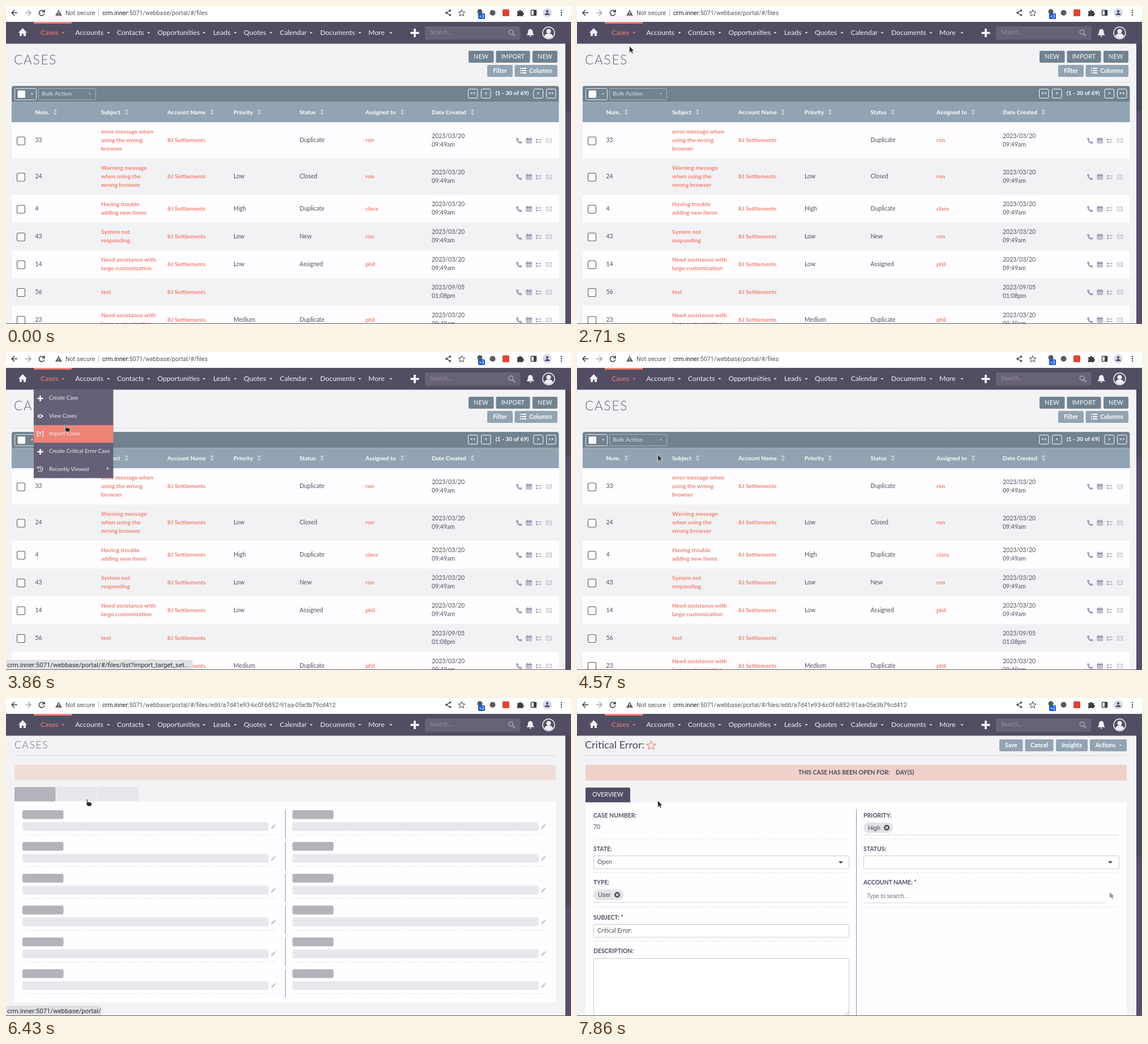
An HTML page for the animation above (8000 ms loop, 998 by 561 pixels).

```html
<!DOCTYPE html>
<html lang="en">
<head>
<meta charset="utf-8">
<title>Case list</title>
<style>
  html, body { margin: 0; width: 100%; height: 100%; overflow: hidden; background: #f3f2f4; }
  svg { display: block; width: 100vw; height: 100vh; font-family: Lato, sans-serif; }
  .ui { font-family: Roboto, sans-serif; }
  .arial { font-family: "Liberation Sans", Arial, sans-serif; }
</style>
</head>
<body>
<svg id="stage" viewBox="0 0 998 561"></svg>
<script>
const INK = '#534d64', SALMON = '#f08377', SLATE = '#718290', STEEL = '#92a4b3', PANEL = '#fffdff', ICON = '#9c99b7';
const HOST = 'crm.inner', PATH = ':5071/webbase/portal/';
const LIST_URL = PATH + '#/files';
const EDIT_URL = LIST_URL + '/edit/a7d41e93-6c0f-b852-91aa-05e3b79cd412';
const IMPORT_URL = HOST + LIST_URL + '/list?import_target_set...';

// Drawing helpers; text is placed by its vertical centre.
const rect = (x, y, w, h, fill, r = 0, more = '') =>
  `<rect x="${x}" y="${y}" width="${w}" height="${h}" fill="${fill}" rx="${r}" ${more}/>`;
const box = (x, y, w, h, stroke, r = 2, fill = 'none', sw = 1) =>
  rect(x + .5, y + .5, w - 1, h - 1, fill, r, `stroke="${stroke}" stroke-width="${sw}"`);
const text = (x, y, str, fill = INK, size = 10.5, more = '') =>
  `<text x="${x}" y="${y + size * .35}" fill="${fill}" font-size="${size}" ${more}>${str}</text>`;
const bold = (x, y, str, fill = INK, size = 10.3, more = '') =>
  text(x, y, str, fill, size, 'font-weight="700" ' + more);
const MID = 'text-anchor="middle"';
const path = (d, fill, more = '') => `<path d="${d}" fill="${fill}" ${more}/>`;
const line = (d, stroke, w = 1, more = '') => path(d, 'none', `stroke="${stroke}" stroke-width="${w}" ${more}`);
const circle = (x, y, r, fill, more = '') => `<circle cx="${x}" cy="${y}" r="${r}" fill="${fill}" ${more}/>`;
const at = (x, y, body) => `<g transform="translate(${x} ${y})">${body}</g>`;
const layer = (id, body) => `<g id="${id}">${body}</g>`;
const caret = (x, y, fill, r = 3) => path(`M${x - r} ${y - r / 2}h${2 * r}l${-r} ${r}z`, fill);
const plus = (x, y, r, w) => line(`M${x - r} ${y}h${2 * r}M${x} ${y - r}v${2 * r}`, '#fff', w);
const dots = (x1, x2, y, gap = 4) => line(`M${x1} ${y}H${x2}`, '#c3c2cb', 1, `stroke-dasharray="1.5 ${gap}"`);
const button = (x, y, w, label, fill, tx = x + w / 2) =>
  rect(x, y, w, 21, fill, 2) + bold(tx, y + 10, label, '#fff', 10.5, MID);

function browserBar() {
  const dark = '#3c4043';
  return rect(0, 0, 998, 28, '#fff') +
    line('M20 12H10.500M15 7l-5 5l5 5', dark, 1.5) +
    line('M34 12h9.500M39 7l5 5l-5 5', '#a5a7aa', 1.5) +
    line('M67 9.500a4.700 4.700 0 1 0 .8 3.500M68 6.500v4h-4', dark, 1.5) +
    path('M93 6.500l6 10.500h-12z', '#5f6368') + line('M93 10v3.500M93 14.500v1.300', '#fff', 1.2) +
    text(105, 12, 'Not secure', '#55585c', 10.8, 'class="ui"') +
    rect(163, 6, 1, 12, '#b9bbbe') +
    `<text class="ui" x="170" y="15.700" font-size="10.700" fill="#202124">${HOST}<tspan id="url" fill="#55585c"></tspan></text>` +
    line('M784 8l-6 4l6 4', dark, 1.2) + circle(784.5, 8, 1.8, dark) + circle(778, 12, 1.8, dark) + circle(784.5, 16, 1.8, dark) +
    path('M805 6.500l1.600 3.900l4.200.3l-3.200 2.700l1 4.100l-3.600-2.200l-3.600 2.200l1-4.100l-3.200-2.700l4.200-.3z', 'none', `stroke="${dark}"`) +
    circle(837, 10, 4.5, '#55585c') + rect(834, 13, 12, 10, '#1757d6', 2) + bold(840, 18, '+3', '#fff', 7.5, MID) +
    circle(859.5, 12, 5, '#5b5b5b') + rect(877, 6, 12, 12, '#de4335', 1.5) +
    path('M903 9h3a2 2 0 0 1 4 0h3v3a2 2 0 0 1 0 4v2h-4a2 2 0 0 0-3 0h-3v-4a2 2 0 0 0 0-3z', dark) +
    box(927, 7, 10, 10, dark, 1, '#fff', 1.5) + rect(932, 7, 5, 10, dark) +
    circle(956, 12, 8, '#d5dbea') + circle(956, 9.5, 2.2, INK) + path('M951.500 16q0-3.500 4.500-3.500t4.500 3.500z', INK) +
    [8, 12, 16].map(y => circle(981, y, 1.2, dark)).join('');
}

function navBar() {
  const items = [['Cases', 61, 101], ['Accounts', 122.5, 181], ['Contacts', 196, 252], ['Opportunities', 267.5, 350],
    ['Leads', 366, 405], ['Quotes', 420, 468], ['Calendar', 483.5, 539], ['Documents', 555, 625], ['More', 640, 680]];
  return rect(0, 28, 998, 38.500, INK) + rect(49, 28, 67, 3, SALMON) +
    path('M22 47l7.500-8l7.500 8h-2v6h-4v-4h-3v4h-4v-6z', '#f1eff4') +
    items.map(([label, x, cx], i) => {
      const fill = i ? '#f4f2f7' : SALMON;
      return text(x, 46.5, label, fill, 12.2) + caret(cx, 47.5, fill, 2.7);
    }).join('') +
    plus(722, 47.5, 7.5, 3.6) +
    rect(740, 36, 168.500, 23.500, '#686279', 3) + text(749, 46.500, 'Search...', '#958fa2', 10.6) +
    circle(892, 46, 3.8, 'none', 'stroke="#aaa5b5" stroke-width="1.500"') + line('M895 49l4 4', '#aaa5b5', 1.8) +
    path('M919.500 51.500q2.500-2 2.500-6q0-4.500 4.200-5q4.200.5 4.200 5q0 4 2.500 6zM924.300 52.500h3.800q-1.900 4-3.800 0', '#f1eff4') +
    circle(958.5, 47.5, 10.5, 'none', 'stroke="#f1eff4" stroke-width="1.500"') + circle(958.5, 44.5, 4, '#f1eff4') +
    path('M951 53.500q1-5 7.500-5t7.500 5q-3 3.500-7.500 3.500t-7.500-3.500', '#f1eff4');
}

const rowIcons = y => at(906, y, path('M-5-4l2.500-1.200l2 3l-1.300 1.500q1 2 3 3l1.500-1.300l2.800 2l-1.200 2.500q-8-.5-9.300-9.500', ICON)) +
  at(923.5, y, box(-5, -4, 10.5, 9, ICON, 1, '#e0dee8') + rect(-5, -4, 10.5, 3, ICON) +
    line('M-4 1.500h8M-2 -1v5M1.500-1v5', ICON, .8) + line('M-2.500-6v2M2.500-6v2', ICON, 1.3)) +
  at(941, y, rect(-5, -3, 3, 2.5, ICON) + rect(-5, 1.5, 3, 2.5, ICON) + line('M-.5-1.800h5M-.5 2.700h5', ICON, 1.2)) +
  at(959, y, box(-5, -4, 10, 8, '#b9b6c8', .5, 'none', .9) + line('M-4.500-3.500l4.500 4l4.500-4M-4.500 3.500l3-3M4.500 3.500l-3-3', '#b9b6c8', .9));

function listPage() {
  const columns = [['Num.', 51.5, 87], ['Subject', 168, 213], ['Account Name', 285, 364], ['Priority', 402, 447],
    ['Status', 518.5, 558], ['Assigned to', 635, 700], ['Date Created', 752, 824]];
  const early = ['2023/03/20', '09:49am'];
  const rows = [
    [64, 33, ['error message when', 'using the wrong', 'browser'], '', 'Duplicate', 'ron', early],
    [64, 24, ['Warning message', 'when using the', 'wrong browser'], 'Low', 'Closed', 'ron', early],
    [49, 4, ['Having trouble', 'adding new items'], 'High', 'Duplicate', 'clara', early],
    [49, 43, ['System not', 'responding'], 'Low', 'New', 'ron', early],
    [49, 14, ['Need assistance with', 'large customization'], 'Low', 'Assigned', 'phil', early],
    [49, 56, ['test'], '', '', '', ['2023/09/05', '01:08pm']],
    [49, 23, ['Need assistance with', 'large customization'], 'Medium', 'Duplicate', 'phil', early]];
  const stack = (x, y, lines, draw, fill) =>
    lines.map((s, i) => draw(x, y + (i - (lines.length - 1) / 2) * 15.3, s, fill)).join('');
  let top = 205;
  const body = rows.map(([h, num, subject, priority, status, owner, date], i) => {
    const y = top + h / 2 - .5, fill = i % 2 ? '#f2f1f3' : PANEL;
    const out = rect(10, top, 966.5, h, fill) + box(19, y - 6, 15, 15, '#5c5a61', 2.5, '#fff', 1.1) +
      text(51.5, y, num) + stack(168, y, subject, bold, SALMON) + bold(285, y, '8J Settlements', SALMON) +
      text(402, y, priority) + text(518.5, y, status) + bold(635, y, owner, SALMON) +
      stack(752, y, date, text, INK) + rowIcons(y + 1);
    top += h;
    return out;
  }).join('');
  const pager = (x, label) => box(x, 146, 17.5, 17, '#fff', 2) + bold(x + 8.7, 154, label, '#fff', 8.5, MID);
  const upper = (x, w, label) => rect(x, 79, w, 21, SLATE, 2) +
    text(x + w / 2, 89, label, '#fff', 10.5, MID + ' letter-spacing=".3"');
  return text(14, 95.5, 'CASES', '#67616f', 22.5, 'font-weight="300" letter-spacing="1.8"') +
    upper(817, 44.5, 'NEW') + upper(865.5, 60, 'IMPORT') + upper(930, 44, 'NEW') +
    button(850, 104, 45, 'Filter', STEEL) + button(898.5, 104, 75.5, 'Columns', STEEL, 944.5) +
    [110, 114, 118].map(y => rect(908, y - 1, 2, 2, '#fff') + rect(911.5, y - 1, 7.5, 2, '#fff')).join('') +
    line('M10 134.500H974', '#d4d2d9', 1, 'stroke-dasharray="1.500 1"') +
    path('M10 169.500V145q0-4 4-4H972.500q4 0 4 4V169.500z', SLATE) + rect(10, 169.5, 966.5, 35.5, STEEL) +
    box(15, 145, 39, 21, '#e8ecef', 2) + rect(20, 148.500, 14.500, 14, '#fff', 2, 'stroke="#555c66" stroke-width=".7"') + caret(46, 155, '#fff', 2.2) +
    box(57, 145, 102, 21, '#aab5be', 2) + bold(63, 154.500, 'Bulk Action', '#c3ccd3') + caret(148, 155, '#c3ccd3', 2.2) +
    pager(816, '&lt;&lt;') + pager(839, '&lt;') + bold(894, 153.500, '(1 - 30 of 69)', '#fff', 10.3, MID) +
    pager(931.5, '&gt;') + pager(954, '&gt;&gt;') +
    columns.map(([label, x, sx]) => bold(x, 187, label, '#fff') +
      path(`M${sx - 3.2} 186l3.200-4.500l3.200 4.500zm0 2.200l3.200 4.500l3.200-4.500z`, '#c6d0d8')).join('') + body;
}

function menu() {
  const labels = ['Create Case', 'View Cases', 'Import Cases', 'Create Critical Error Case', 'Recently Viewed'];
  return rect(49, 66, 140.5, 156.5, '#656078') + rect(49, 0, 140.5, 31, SALMON, 0, 'id="hover"') +
    labels.map((s, i) => text(76, 81 + i * 31.3, s, '#efedf3', 9.7)).join('') +
    plus(60.5, 82, 5, 2.5) + plus(60.5, 176, 5, 2.5) +
    path('M55 113q5.500-7 11 0q-5.500 7-11 0', '#efedf3') + circle(60.5, 113, 2, '#656078') +
    line('M58 140.500h-2.500v8h2.500M63 140.500h2.500v8h-2.500M60.500 141v6M58.500 144l2-2.500l2 2.500', '#efedf3', 1.3) +
    line('M56.500 204a4.500 4.500 0 1 1 0 5M55.500 202v3h3M60.500 204v3l2 1', '#efedf3', 1.1) +
    path('M178.500 203l3 2.500l-3 2.500z', '#efedf3');
}

function skeletonPage() {
  const field = (x, y) => rect(x, y, 72.5, 15.5, '#b6b2bc', 3) + rect(x, y + 21, 434.5, 15.5, '#e7e8ed', 3) +
    at(x + 443, y + 28.5, line('M-3 3.500l5.500-5.500', '#c2c1c8', 2.6) + line('M3-2.500l1-1', '#c2c1c8', 2.6)) +
    dots(x + 1, x + 452, y + 43);
  let out = text(15, 83, 'CASES', '#67616f', 17, 'font-weight="300" letter-spacing="2"') +
    line('M15 101.500H971', '#d9d7dd') + rect(15, 118, 956, 26.5, '#f1ddd8', 2) +
    rect(15, 157, 72.5, 26, '#b6b2bc', 2) + rect(89, 157, 71.5, 26, '#e7e8ec') + rect(162, 157, 72, 26, '#e7e8ec') +
    rect(15, 182.5, 956, 355, PANEL);
  for (let i = 0; i < 6; i++) {
    const y = 198 + i * 56.1;
    out += field(29, y) + field(506, y) + line(`M493.500 ${y}v50`, '#8ba3ae', 1.2);
  }
  return out;
}

function formPage() {
  const chip = (x, y, w, label) => rect(x, y, w, 18.5, '#e3e2e5', 9) + text(x + 8, y + 9.5, label, '#4e4a56', 10.6, 'class="arial"') +
    circle(x + w - 11, y + 9.3, 5, '#514d59') + line(`M${x + w - 13} ${y + 7.3}l4 4m0-4l-4 4`, '#fff', 1.3);
  const input = (x, y, h) => box(x, y, 452, h, '#cac8d0', 2, '#fff');
  const under = (x1, x2, y) => line(`M${x1} ${y}H${x2}`, '#d8d6dc');
  return text(14, 83, 'Critical Error:', '#4b465a', 18.1) +
    path('M131 76l2.200 5.200l5.600.4l-4.300 3.600l1.400 5.500l-4.900-3l-4.900 3l1.400-5.500l-4.300-3.600l5.600-.4z', 'none', `stroke="${SALMON}" stroke-width="1.200"`) +
    button(746, 73, 41.5, 'Save', STEEL) + button(791.5, 73, 50, 'Cancel', STEEL) +
    button(846, 73, 56, 'Insights', STEEL) + button(906, 73, 65, 'Actions', STEEL, 933.5) + caret(960, 83.5, '#fff', 2.2) +
    line('M15 101.500H971', '#d9d7dd') + rect(15, 118, 956, 27.5, '#efd1cb', 2) +
    bold(391, 131, 'THIS CASE HAS BEEN OPEN FOR:', '#4b465a', 10.4) + bold(563, 131, 'DAY(S)', '#4b465a', 10.4) +
    rect(15, 184, 956, 377, PANEL) + path('M15 184v-24q0-2 2-2H92q2 0 2 2v24z', INK) + text(27, 170, 'OVERVIEW', '#fff') +
    line('M493.500 196V561', '#7f9aa5') +
    [['CASE NUMBER:', 207], ['STATE:', 266], ['TYPE:', 325.5], ['SUBJECT: *', 387], ['DESCRIPTION:', 446.5]]
      .map(([s, y]) => bold(29, y, s, INK, 10.4)).join('') +
    [['PRIORITY:', 207], ['STATUS:', 266], ['ACCOUNT NAME: *', 325.5]].map(([s, y]) => bold(506, y, s, INK, 10.4)).join('') +
    [248.5, 308.5, 368.5, 429.5].map(y => dots(30, 481, y)).join('') +
    [248.5, 308.5, 368.5].map(y => dots(507, 957, y)).join('') +
    text(29, 227, '70') + input(29, 278, 23.5) + text(36, 289.5, 'Open') + caret(466, 290, '#4e4a5c', 4.2) +
    chip(29, 338, 53, 'User') + under(29, 481, 360.5) +
    input(29, 399, 23.5) + text(36, 410.5, 'Critical Error:') +
    input(29, 459, 103) + line('M474 559.500l6-6M478 559.500l2-2', '#8a8890', .8) +
    chip(506, 219.5, 52, 'High') + under(506, 957, 241.5) +
    input(506, 278, 23.5) + caret(942, 290, '#4e4a5c', 4.2) +
    text(512, 349, 'Type to search...', '#77747f', 10, 'class="arial"') + under(506, 933, 361.5) +
    path('M941 343v9.500l2.400-2l1.600 4l2-1l-1.700-3.600h3.400z', '#8199ab');
}

const outline = 'stroke="#fff" stroke-width=".8"';
const arrow = path('M.5 .5V13L3.300 10.500L5.300 14.500L7.300 13.500L5.500 9.700H9.100Z', '#2b2b2e', outline);
const hand = path('M0-.8Q1.200-2.800 2.300-.8V3L8 4.300Q9.800 4.800 9.500 6.500L8.500 11H2.500L-.8 6.800Q-1 5.300 .8 6Z', '#2b2b2e', outline);

stage.innerHTML = rect(0, 0, 998, 561, '#f3f2f4') + layer('list', listPage()) + layer('skeleton', skeletonPage()) +
  layer('form', formPage()) + rect(988, 66, 10, 495, '#564e69') + rect(988, 66, 9.5, 100, '#4c485a', 0, 'id="thumb"') +
  browserBar() + navBar() + layer('dropdown', menu()) +
  layer('status', path('', '#e2e2e6', 'id="bubble" stroke="#c9c9ce" stroke-width=".8"') +
    text(2, 552.5, '', '#2c2d30', 11.4, 'class="ui" id="link"')) +
  rect(0, 560, 998, 1, '#5d5a63') + layer('pointer', layer('arrow', arrow) + layer('hand', hand));

const $ = id => document.getElementById(id);
const show = (id, on) => $(id).setAttribute('display', on ? 'inline' : 'none');

const LOOP = 8000, STEP = LOOP / 56, ITEM_HEIGHT = 31.3;
const track = [[280, 880, 600], [1140, 837, 342], [1430, 800, 330], [2290, 130, 95], [2710, 92, 70], [2860, 86, 52],
  [3150, 90, 62], [3430, 100, 98], [3720, 104, 130], [3860, 104, 130], [4150, 142, 180]];

function pointerAt(t) {
  const i = track.findIndex(k => k[0] > t);
  if (i <= 0) return track[i ? track.length - 1 : 0].slice(1);
  const [t0, x0, y0] = track[i - 1], [t1, x1, y1] = track[i];
  const p = (t - t0) / (t1 - t0), e = p * p * (3 - 2 * p);
  return [x0 + (x1 - x0) * e, y0 + (y1 - y0) * e];
}

function render(now) {
  const t = Math.floor((now % LOOP + 4) / STEP) * STEP + 4;
  const page = t < 5857 ? 'list' : t < 6857 ? 'skeleton' : 'form';
  const [x, y] = pointerAt(t);
  const menuOpen = t >= 2857 && t < 4428, overLoader = t >= 5857 && t < 7000;
  const item = menuOpen && y >= 66 ? Math.min(4, Math.floor((y - 66) / ITEM_HEIGHT)) : -1;

  for (const id of ['list', 'skeleton', 'form']) show(id, id === page);
  $('url').textContent = page === 'list' ? LIST_URL : EDIT_URL;
  $('thumb').setAttribute('height', { list: 119, skeleton: 301, form: 213 }[page]);
  show('dropdown', menuOpen);
  show('hover', item >= 0);
  $('hover').setAttribute('y', Math.round(66.4 + item * ITEM_HEIGHT));

  const longLink = item >= 0 && item < 3;
  const width = longLink ? 329 : 167;
  show('status', item >= 0 || t >= 5857 && t < 7143);
  $('link').textContent = longLink ? IMPORT_URL : HOST + PATH;
  $('bubble').setAttribute('d', `M-1 562V544H${width - 4}q4 0 4 4V562z`);

  const pointing = menuOpen || overLoader;
  show('arrow', !pointing);
  show('hand', pointing);
  $('pointer').setAttribute('transform', `translate(${x} ${y})`);
}

const start = performance.now();
(function tick() {
  render(performance.now() - start);
  requestAnimationFrame(tick);
})();
</script>
</body>
</html>
```
